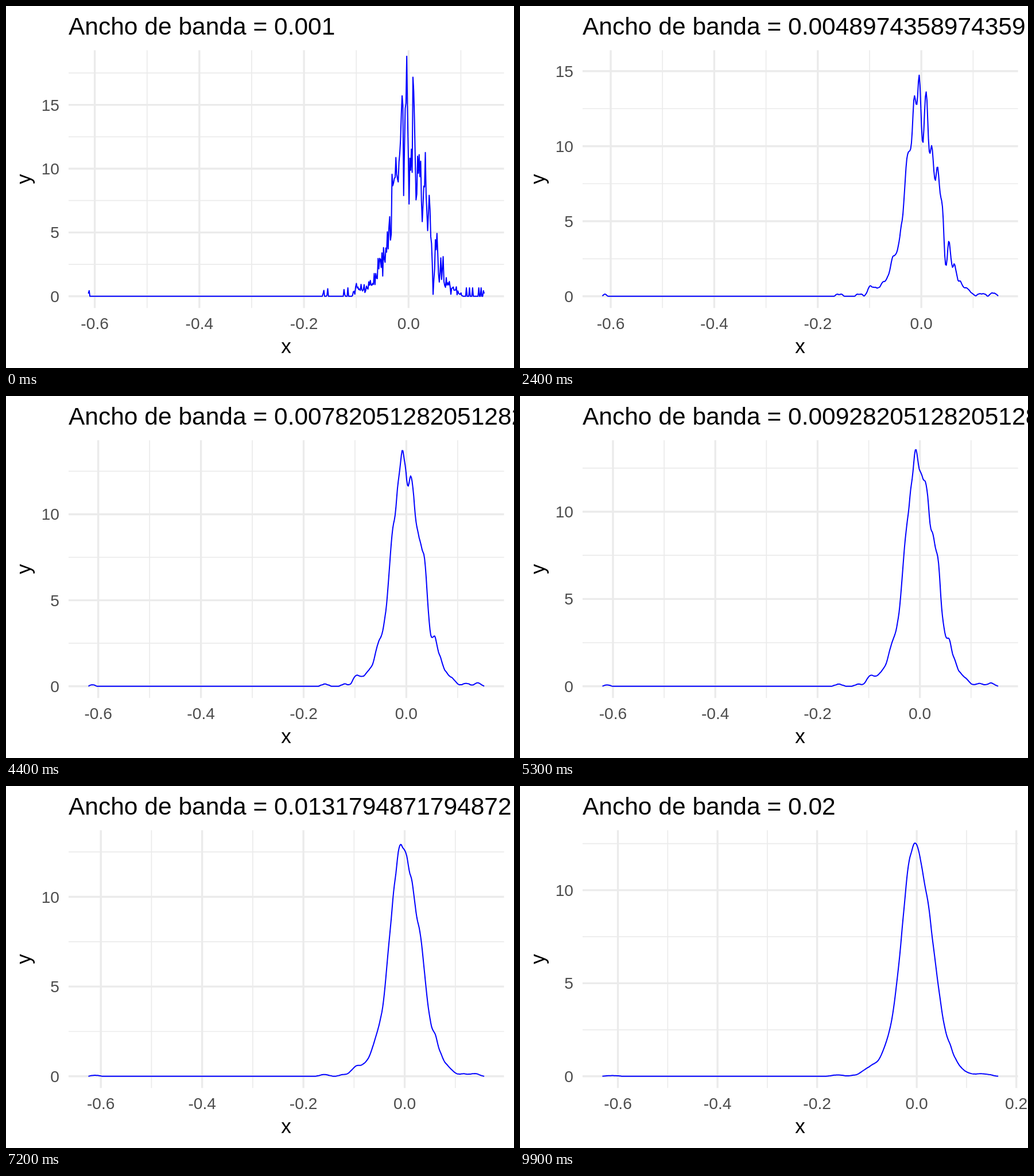
Animation, 885 px wide and 632 px high, one loop 10000 ms. Source, as an HTML page with a canvas:

```html
<!DOCTYPE html>
<html lang="es">
<head>
<meta charset="utf-8">
<title>Ancho de banda</title>
<style>
html, body { margin: 0; width: 100%; height: 100%; overflow: hidden; background: #fff; }
canvas { display: block; }
</style>
</head>
<body>
<canvas id="stage" width="885" height="632"></canvas>
<script>
const ctx = document.getElementById('stage').getContext('2d');

const FRAME_MS = 100, FRAMES = 100;
const GRID = 512;
const MIN_X = -0.6112, MAX_X = 0.1436;
const panel = { left: 109, right: 867.6, top: 77.3, bottom: 527.3 };
const plot = { left: 143.5, right: 833.1, top: 97.75, bottom: 506.8 };
const FONT = '"Liberation Sans", Arial, Helvetica, sans-serif';

// Key points of the sample's density: grid index, height
const outline = [
  [340, 0], [346, .7], [357, .55], [371, 1.3], [376, 2.8], [382, 2.8],
  [389, 5.5], [391, 4.8], [392, 8.8], [397, 9.8], [400, 9],
  [405, 15.5], [406, 14.5], [407, 8], [409, 14.5], [411, 18.3], [414, 6.9],
  [415, 10.7], [418, 10.8], [419, 16.8], [420, 16.6], [423, 7.2],
  [425, 10.2], [429, 10.2], [431, 5.8], [435, 10.4], [438, 5.3], [440, 7.2],
  [443, 4.7], [444, 1.3], [446, 1.3], [450, 4.8], [452, 1.8], [457, 2.4],
  [460, 1.1], [484, 0]
];
// Lone observations out in the tails
const lone = [.67, 303.7, 308.9, 330.2, 335, 488, 492, 496, 504, 507, 510.33];
const LONE_HEIGHT = .66;

// Top of the y axis by bandwidth step
const peaks = [[0, 18.36], [3.5, 17.02], [8, 15.61], [14.5, 13.62], [20.5, 13.22], [31.5, 12.86], [39, 12.59]];

const lerp = (a, b, t) => a + (b - a) * t;
const bandwidth = i => 0.001 + i * 0.019 / 39;
const spacing = h => (MAX_X - MIN_X + 2 * h) / (GRID - 1);

function along(points, p) {
  const n = points.findIndex(([q]) => q >= p);
  if (n < 0) return 0;
  if (n === 0) return p === points[0][0] ? points[0][1] : 0;
  const [p0, v0] = points[n - 1], [p1, v1] = points[n];
  return lerp(v0, v1, (p - p0) / (p1 - p0));
}

function seeded(seed) {
  return () => {
    seed = (seed * 16807) % 2147483647;
    return seed / 2147483647;
  };
}

// The jitter is a difference of neighbours, so smoothing cancels it
function sample() {
  const random = seeded(2024);
  let last = random();
  const raw = Array.from({ length: GRID }, (_, k) => {
    const next = random(), v = along(outline, k);
    const jitter = (next - last) * Math.min(v, 1.5);
    last = next;
    return v + jitter;
  });
  for (const p of lone) {
    const k = Math.floor(p), f = p - k;
    raw[k] += LONE_HEIGHT * (1 - f);
    raw[k + 1] += LONE_HEIGHT * f;
  }
  return raw;
}

const raw = sample();

function rawAt(p) {
  const k = Math.floor(p);
  return lerp(raw[k] || 0, raw[k + 1] || 0, p - k);
}

// Epanechnikov smoothing on the grid that belongs to step i
function density(i) {
  const h = bandwidth(i), h0 = bandwidth(0);
  const step = spacing(h), step0 = spacing(h0);
  const reach = Math.floor(h / step);
  const kernel = [];
  let total = 0;
  for (let l = -reach; l <= reach; l++) {
    const w = 1 - (l * step / h) ** 2;
    kernel.push(w);
    total += w;
  }
  return Array.from({ length: GRID }, (_, k) => {
    let sum = 0;
    kernel.forEach((w, n) => {
      sum += w * rawAt(((k + n - reach) * step - h + h0) / step0);
    });
    return sum / total;
  });
}

const curves = Array.from({ length: 40 }, (_, i) => density(i));

// Three frames per step at first, two per step later on
function stepAt(frame) {
  if (frame > 63) return 21 + (frame - 63) / 2;
  return Math.floor(frame / 3) + (frame % 3 === 2 ? 0.5 : 0);
}

function line(x0, y0, x1, y1, width) {
  ctx.lineWidth = width;
  ctx.beginPath();
  ctx.moveTo(x0, y0);
  ctx.lineTo(x1, y1);
  ctx.stroke();
}

function text(str, x, y, size, color, align) {
  ctx.font = size + 'px ' + FONT;
  ctx.fillStyle = color;
  ctx.textAlign = align;
  ctx.fillText(str, x, y);
}

function drawGrid(toX, toY) {
  const xs = [], ys = [];
  for (let n = -7; n <= 3; n++) {
    const x = toX(n / 10);
    if (x >= panel.left && x <= panel.right) xs.push({ x, n, major: n % 2 === 0 });
  }
  for (let n = 0; n < 9; n++) {
    const y = toY(n * 2.5);
    if (y >= panel.top) ys.push({ y, n, major: n % 2 === 0 });
  }
  ctx.strokeStyle = '#ebebeb';
  for (const major of [false, true]) {
    const width = major ? 3.4 : 1.7;
    ys.filter(g => g.major === major).forEach(g => line(panel.left, g.y, panel.right, g.y, width));
    xs.filter(g => g.major === major).forEach(g => line(g.x, panel.top, g.x, panel.bottom, width));
  }
  for (const g of xs) {
    if (g.major) text((g.n / 10).toFixed(1), g.x, 563.5, 28.2, '#4d4d4d', 'center');
  }
  for (const g of ys) {
    if (g.major) text(String(g.n * 2.5), 93, g.y + 10, 28.2, '#4d4d4d', 'right');
  }
}

function drawCurve(i, toY) {
  const low = Math.floor(i);
  const a = curves[low], b = curves[Math.ceil(i)];
  ctx.strokeStyle = '#0000ff';
  ctx.lineWidth = 2;
  ctx.lineJoin = 'round';
  ctx.beginPath();
  a.forEach((v, k) => ctx.lineTo(
    lerp(plot.left, plot.right, k / (GRID - 1)),
    toY(lerp(v, b[k], i - low))
  ));
  ctx.stroke();
}

function draw(i) {
  const h = bandwidth(i), peak = along(peaks, i);
  const start = MIN_X - h, span = MAX_X - MIN_X + 2 * h;
  const toX = x => lerp(plot.left, plot.right, (x - start) / span);
  const toY = y => lerp(plot.bottom, plot.top, y / peak);

  ctx.fillStyle = '#fff';
  ctx.fillRect(0, 0, 885, 632);
  drawGrid(toX, toY);
  drawCurve(i, toY);

  const label = Number(bandwidth(Math.floor(i)).toPrecision(15));
  text('Ancho de banda = ' + label, 109, 49.5, 42.5, '#000', 'left');
  text('x', 488, 606, 35.2, '#000', 'center');
  ctx.save();
  ctx.translate(42.7, 302.3);
  ctx.rotate(-Math.PI / 2);
  text('y', 0, 0, 35.2, '#000', 'center');
  ctx.restore();
}

const origin = performance.now();
let shown = -1;
function tick() {
  const elapsed = Math.max(0, performance.now() - origin);
  const frame = Math.floor(elapsed / FRAME_MS) % FRAMES;
  if (frame !== shown) {
    shown = frame;
    draw(stepAt(frame));
  }
  requestAnimationFrame(tick);
}
tick();
</script>
</body>
</html>
```
